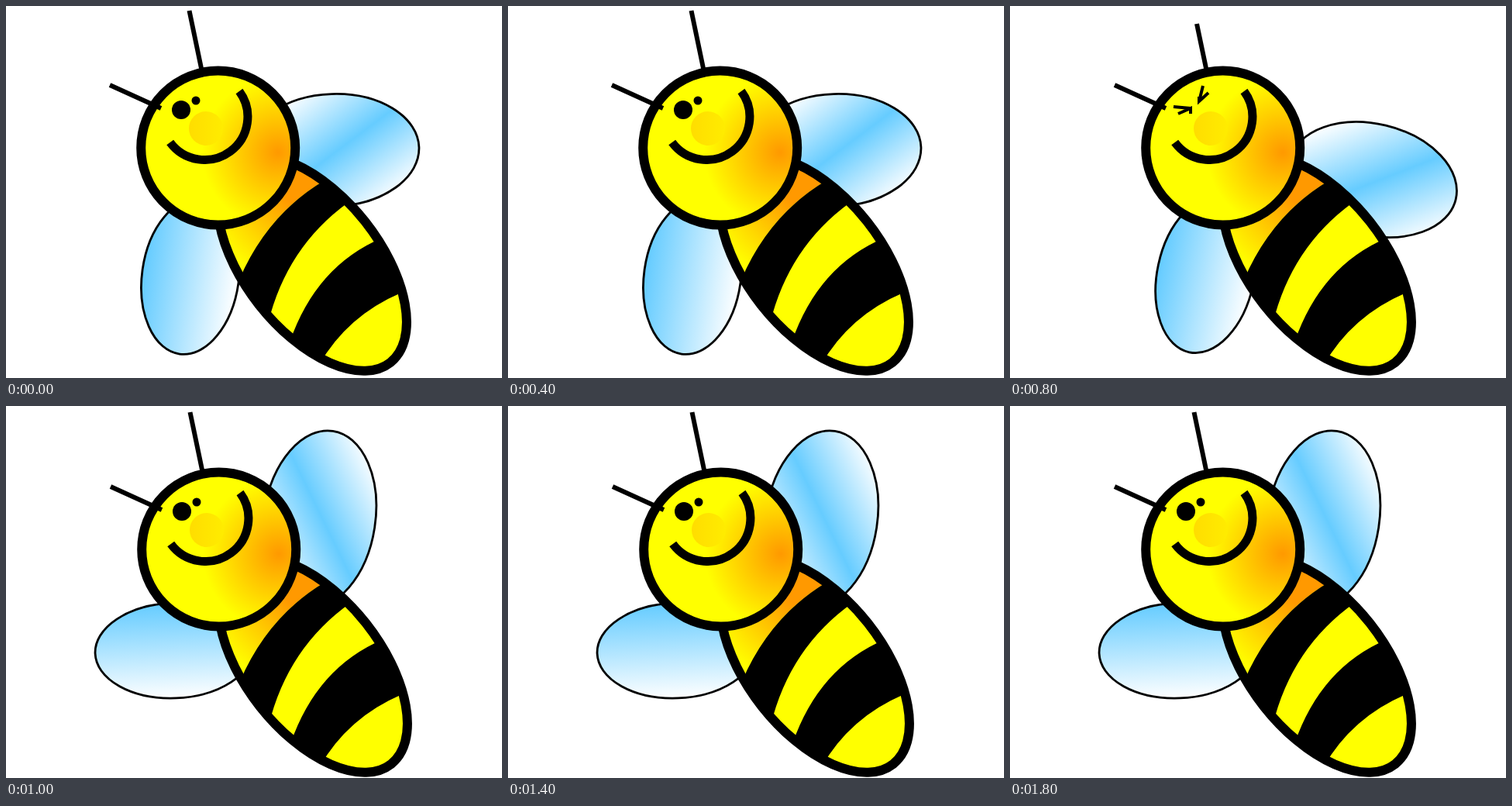
An HTML page that plays this animation: 640 by 480 pixels, repeating every 2000 ms.

```html
<!DOCTYPE html>
<html lang="en">
<head>
<meta charset="utf-8">
<title>Bee</title>
<style>
  html, body { margin: 0; width: 100%; height: 100%; overflow: hidden; background: #fff; }
  svg { display: block; width: 640px; height: 480px; }
  .line { fill: none; stroke: #000; }
  .wing { stroke: #000; stroke-width: 2.8; }
</style>
</head>
<body>
<svg viewBox="0 0 640 480">
  <defs>
    <linearGradient id="leftFill" gradientUnits="userSpaceOnUse" x1="0" y1="-60" x2="0" y2="62">
      <stop stop-color="#6cf"/><stop offset="1" stop-color="#fff"/>
    </linearGradient>
    <linearGradient id="rightFill" gradientUnits="userSpaceOnUse" x1="-50" y1="-72" x2="54" y2="78">
      <stop stop-color="#fff"/><stop offset=".5" stop-color="#6cf"/><stop offset="1" stop-color="#fff"/>
    </linearGradient>
    <radialGradient id="headFill" gradientUnits="userSpaceOnUse" cx="351" cy="189" r="98">
      <stop stop-color="#f90"/><stop offset="1" stop-color="#ff0"/>
    </radialGradient>
    <radialGradient id="neckFill" gradientUnits="userSpaceOnUse" cx="382" cy="232" r="128">
      <stop stop-color="#f90"/><stop offset=".2" stop-color="#f90"/><stop offset="1" stop-color="#ff0"/>
    </radialGradient>
    <linearGradient id="noseFill">
      <stop stop-color="#fd0"/><stop offset="1" stop-color="#ffec00"/>
    </linearGradient>
    <clipPath id="bodyClip">
      <ellipse cx="395" cy="332" rx="163" ry="87" transform="rotate(51.7 395 332)"/>
    </clipPath>
  </defs>

  <ellipse id="leftWing" class="wing" fill="url(#leftFill)"/>
  <ellipse id="rightWing" class="wing" fill="url(#rightFill)"/>

  <g id="bee">
    <g clip-path="url(#bodyClip)">
      <path fill="#ff0" d="M250 150H540V490H250Z"/>
      <path fill="url(#neckFill)" d="M411 225Q337 269 301 353L240 300 370 160Z"/>
      <path d="M411 225Q337 269 301 353L338 410Q363 307 448 249Z"/>
      <path d="M486 299Q400 335 366 434L404 463Q443 395 520 366Z"/>
    </g>
    <ellipse class="line" stroke-width="12" cx="395" cy="332" rx="163" ry="87" transform="rotate(51.7 395 332)"/>
    <circle cx="273.7" cy="183" r="99.5" fill="url(#headFill)" stroke="#000" stroke-width="12"/>
    <circle cx="258" cy="158" r="22" fill="url(#noseFill)"/>
    <path class="line" stroke-width="11" d="M301 110A55.5 55.5 0 1 1 211.7 176"/>
    <path id="antennae" class="line" stroke-width="6"/>
    <g id="openEyes">
      <circle cx="226" cy="134" r="12"/>
      <circle cx="245" cy="122" r="5.5"/>
    </g>
    <path id="shutEyes" class="line" stroke-width="4"
      d="M210 130L232 132M216 139L232 132V139M248 103L243 123M255 112L243 123V117"/>
  </g>
</svg>
<script>
  // Wings: centre x, centre y, radius x, radius y, angle
  const poses = {
    down:  { shift: [0, 0], left: [238, 349, 101, 62.5, -82], right: [422.5, 186, 110.5, 72.5, -2] },
    up:    { shift: [1, 2], left: [217, 315.5, 102, 61.5, -2.2], right: [404.5, 146, 115, 72, -81.3] },
    blink: { shift: [1, 0], left: [252.5, 347, 102, 62.5, -78], right: [468.2, 224, 110, 71.8, 13.5], shut: true }
  };
  const { down, up, blink } = poses;
  const sequence = [down, up, down, up, blink, up, down, up, down, up];
  const el = id => document.getElementById(id);

  function placeWing(id, [x, y, rx, ry, angle]) {
    const wing = el(id);
    wing.setAttribute("rx", rx);
    wing.setAttribute("ry", ry);
    wing.setAttribute("transform", `translate(${x} ${y}) rotate(${angle})`);
  }

  function show({ shift, left, right, shut }) {
    placeWing("leftWing", left);
    placeWing("rightWing", right);
    el("bee").setAttribute("transform", `translate(${shift})`);
    el("antennae").setAttribute("d", `M134 102L200 132M${shut ? "240 23" : "236.5 6"}L254 90`);
    el("openEyes").style.display = shut ? "none" : "";
    el("shutEyes").style.display = shut ? "" : "none";
  }

  let current;
  function tick() {
    const pose = sequence[Math.floor(performance.now() / 200) % sequence.length];
    if (pose !== current) show(current = pose);
    requestAnimationFrame(tick);
  }
  tick();
</script>
</body>
</html>
```
